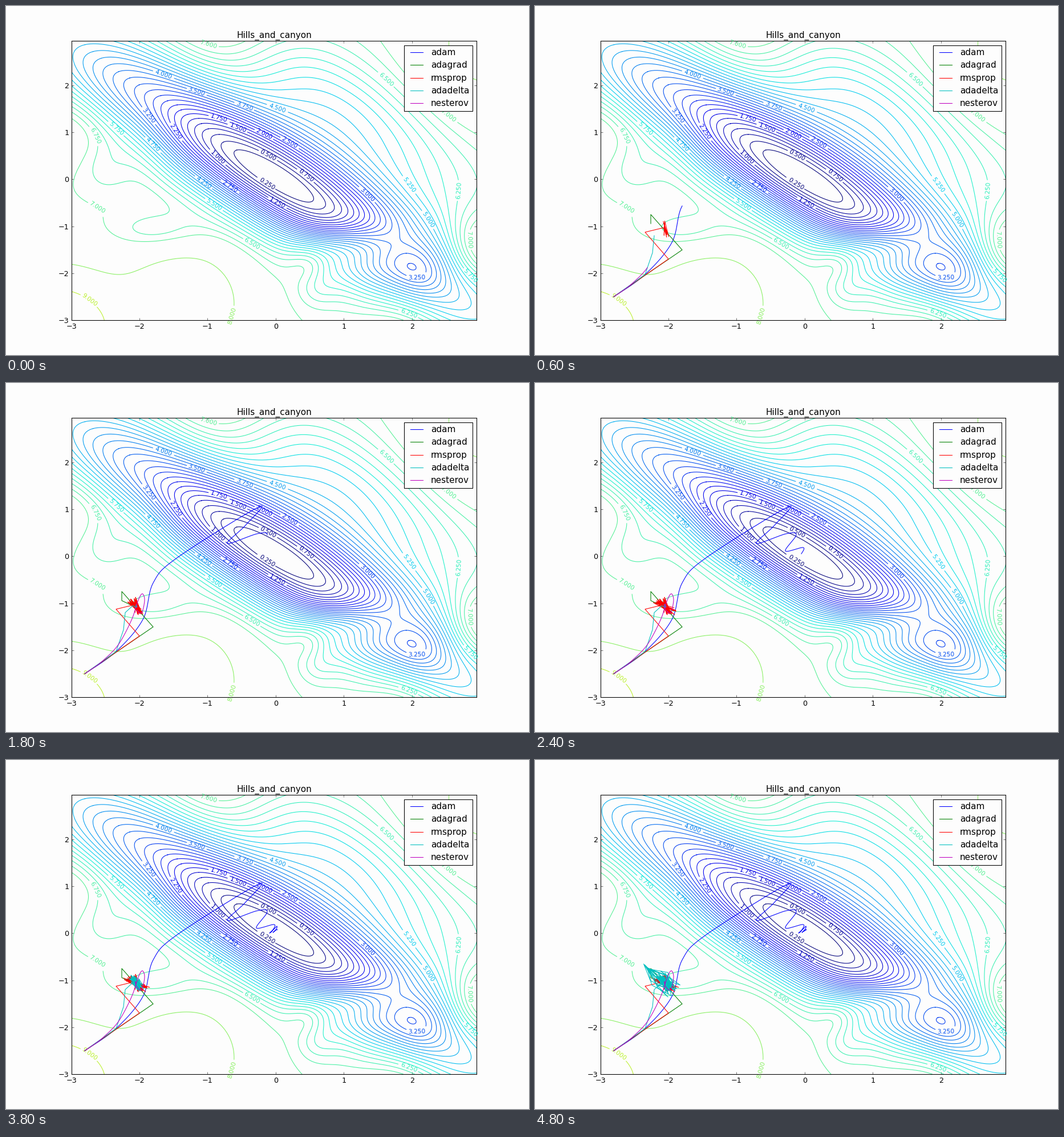
These frames come from a looping animation (917x611 px, 5000 ms). A matplotlib script:

```python
import numpy as np
import matplotlib.pyplot as plt
from matplotlib.animation import FuncAnimation
from matplotlib.patches import Rectangle

W, H, DPI = 917, 611, 72
FRAMES, INTERVAL = 25, 200
PAPER = "#fdfdfd"
LEFT, RIGHT, TOP, BOTTOM = 114.6, 825.3, 61.1, 549.9
ORIGIN, UNIT = (472.9, 303.4), (119.44, -82.15)
CENTRE = np.array([467, 298])
PIT = np.array([228, 391])

plt.rcParams.update({"font.family": "DejaVu Sans", "axes.linewidth": 1.06})

# Bumps and dips on the valley: height, centre x and y, widths
BUMPS = [
    (1.2, 380, 30, 80, 80), (1.3, 840, 70, 90, 90),       # upper rim
    (0.6, 110, 215, 45, 45), (0.55, 235, 215, 55, 55),    # left slope
    (-0.45, 175, 280, 35, 35), (-0.7, 270, 395, 60, 25),  # trap on the left
    (1.9, 315, 520, 75, 75), (3, 90, 570, 80, 80),        # lower left hills
    (2.3, 610, 420, 60, 27), (-0.45, 725, 468, 30, 30),   # ridge, second basin
    (1.6, 835, 430, 45, 45), (0.7, 700, 560, 50, 50),     # its outer rim
    (0.65, 530, 455, 25, 25), (-0.5, 545, 492, 25, 25),   # tongue
]

# Direction of each level's label from the centre, in degrees
BEARINGS = [236, 101, 2, 163, 279, 124, 131, 100, 157, 61, 195, 351, 156, 130,
            110, 135, 187, 84, 167, 346, 358, 207, 165, None, 357, 42, 169, 120,
            255, 216]
MORE_BEARINGS = {3.25: [323], 5.75: [334], 6.25: [313], 6.5: [252],
                 7: [192, 344, 21]}


def surface(x, y):
    """Tilted valley that levels off, with a soft shelf above it."""
    dx, dy = x - CENTRE[0], y - CENTRE[1]
    along, across = 0.846 * dx + 0.533 * dy, 0.846 * dy - 0.533 * dx
    steep = 1.02e-3 + 8e-5 * np.tanh(across / 20)
    z = 7 - 7 * np.exp(-(steep * across**2 + 4.7e-5 * along**2) / 7)
    z -= 1.75 * np.exp(-((along - 40) / 180)**2 / 2 - ((across + 160) / 65)**2 / 2)
    for height, cx, cy, wx, wy in BUMPS:
        z += height * np.exp(-((x - cx) / wx)**2 / 2 - ((y - cy) / wy)**2 / 2)
    return z


def label_spot(points, bearing):
    """Outermost point of a level in a direction, with its upright angle."""
    x, y = points.T
    inside = (abs(x - (LEFT + RIGHT) / 2) < 345) & (abs(y - (TOP + BOTTOM) / 2) < 238)
    angle = np.degrees(np.arctan2(CENTRE[1] - y, x - CENTRE[0]))
    off = abs((angle - bearing + 180) % 360 - 180) + 360 * ~inside
    near = np.flatnonzero(off <= max(2, off.min()))
    i = near[np.hypot(*(points[near] - CENTRE).T).argmax()]
    dx, dy = points[min(i + 3, len(points) - 1)] - points[max(i - 3, 0)]
    return points[i], (90 - np.degrees(np.arctan2(dy, dx))) % 180 - 90


def draw_contours(ax):
    x, y = np.meshgrid(np.linspace(LEFT, RIGHT, 300), np.linspace(TOP, BOTTOM, 210))
    levels = np.r_[np.arange(1, 29) / 4, 8, 9]
    contours = ax.contour(x, y, surface(x, y), levels=levels)
    all_segments = contours.allsegs
    contours.remove()
    for level, segments, bearing in zip(levels, all_segments, BEARINGS):
        if not segments:
            continue
        color = 0.94 * np.array(plt.cm.jet((level - 0.25) / 14.75)[:3])
        bearings = [bearing] * (bearing is not None) + MORE_BEARINGS.get(level, [])
        spots = [label_spot(np.vstack(segments), b) for b in bearings]
        for segment in segments:
            line = segment.copy()
            for spot, _ in spots:
                line[np.hypot(*(segment - spot).T) < 18] = np.nan
            ax.plot(*line.T, color=color, lw=1.06, zorder=2)
        for spot, angle in spots:
            ax.text(*spot, f"{level:.3f}", color=color, size=10.6, ha="center",
                    va="center", rotation=angle, zorder=3)


SMOOTH = 12


def smooth(points):
    """Catmull-Rom curve through the points."""
    p = np.array([points[0], *points, points[-1]], float)
    t = (np.arange(SMOOTH) / SMOOTH)[:, None]
    spans = [0.5 * (2 * b + (c - a) * t + (2 * a - 5 * b + 4 * c - d) * t**2
                    + (3 * b - a - 3 * c + d) * t**3)
             for a, b, c, d in zip(p, p[1:], p[2:], p[3:])]
    return np.vstack([*spans, p[-1:]])


def zigzag(seed, count, tilts, reaches, spread):
    """Steps that overshoot the pit from side to side."""
    rng = np.random.default_rng(seed)
    tilt = np.radians(np.linspace(*tilts, count) + rng.normal(0, spread, count))
    reach = np.linspace(*reaches, count) * rng.uniform(0.5, 1.1, count)
    reach *= (-1.0) ** np.arange(count)
    return PIT + np.c_[reach * np.cos(tilt), reach * np.sin(tilt)]


# Smooth paths have one point per frame
START = (138, 509)
adam = smooth([
    START, (193, 470), (240, 414), (258, 350), (300, 306), (443, 217), (420, 249),
    (388, 281), (440, 264), (458, 266), (439, 294), (470, 288), (467, 299),
    (462, 303), (470, 296), (475, 291), (474, 296), (468, 302), (473, 298),
    (476, 297), (471, 300)])
nesterov = smooth([
    START, (150, 501), (170, 486), (197, 458), (220, 415), (232, 380), (239, 369),
    (243, 380), (238, 402), (229, 397), (227, 388), (228, 391)])
adagrad = np.array([START, (258, 427), (203, 365), (203, 381), (228, 393)])
rmsprop = np.vstack([[START, (234, 443), (193, 396), (226, 388)],
                     zigzag(4, 56, (85, 15), (13, 24), 10)])
swings = zigzag(9, 140, (85, 25), (3, 27), 28)
swings[90::8] = PIT - np.outer(np.linspace(34, 50, 7), (0.75, 0.68))
adadelta = np.vstack([[START, (193, 470), (206, 432), (209, 402), (222, 390)],
                      swings])

# name, colour, path, samples drawn by a frame
RUNS = [
    ("adam", (0, 0, 1), adam, lambda f: SMOOTH * f),
    ("adagrad", (0, 0.5, 0), adagrad, lambda f: f),
    ("rmsprop", (1, 0, 0), rmsprop, lambda f: max(0, 5 * f - 4)),
    ("adadelta", (0, 0.75, 0.75), adadelta, lambda f: f + 10 * max(0, f - 12)),
    ("nesterov", (0.75, 0, 0.75), nesterov, lambda f: SMOOTH * f),
]

fig = plt.figure(figsize=(W / DPI, H / DPI), dpi=DPI, facecolor=PAPER)
ax = fig.add_axes([LEFT / W, 1 - BOTTOM / H, (RIGHT - LEFT) / W, (BOTTOM - TOP) / H],
                  facecolor=PAPER)
draw_contours(ax)

ax.set(xlim=(LEFT, RIGHT), ylim=(BOTTOM, TOP))
marks = np.arange(-3, 3)
names = [str(m).replace("-", "\u2212") for m in marks]
ax.set_xticks(ORIGIN[0] + UNIT[0] * marks, names)
ax.set_yticks(ORIGIN[1] + UNIT[1] * marks, names)
ax.tick_params(direction="in", top=True, right=True, length=4.24, width=0.53,
               labelsize=12.73, pad=4.24)
ax.tick_params(axis="x", pad=5)
ax.set_title("Hills_and_canyon", size=15.28, pad=5.3)

ax.add_patch(Rectangle((698, 69), 120, 115, fc=PAPER, ec="black", lw=1.06, zorder=6))
trails = []
for row, (name, color, *_) in enumerate(RUNS):
    y = 81.3 + 22.15 * row
    trails += ax.plot([], [], color=color, lw=1.06, zorder=4)
    ax.plot([708.5, 731], [y, y], color=color, lw=1.06, zorder=7)
    ax.text(745, y + 4.9, name, size=15.28, va="baseline", zorder=7)


def update(frame):
    for trail, (_, _, path, drawn) in zip(trails, RUNS):
        trail.set_data(*path[:drawn(frame) + 1].T)
    return trails


anim = FuncAnimation(fig, update, frames=FRAMES, interval=INTERVAL,
                     init_func=lambda: update(0), repeat=True, repeat_delay=0)
plt.show()
```
